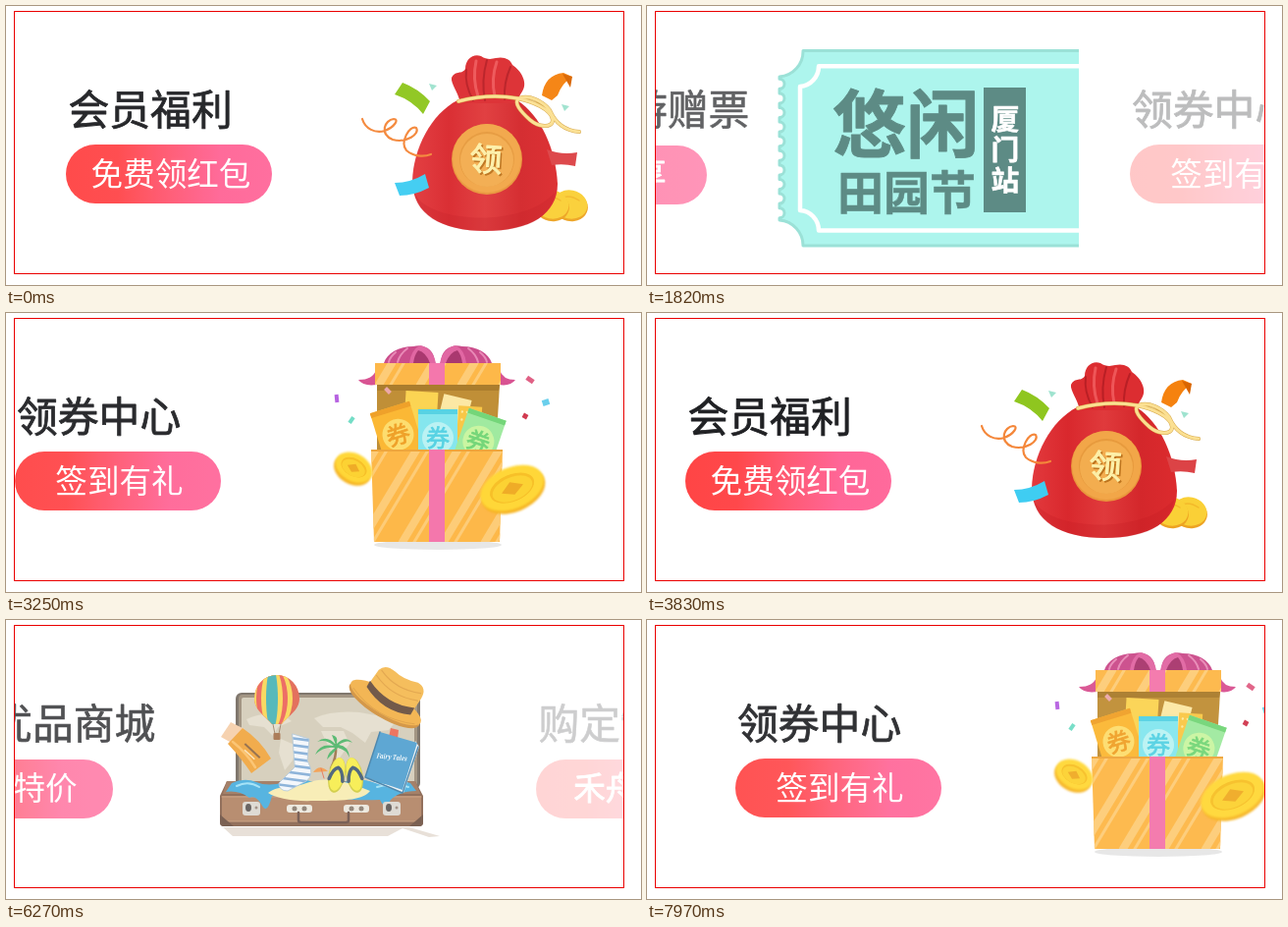
These frames come from a looping animation (647x284 px, 8 s). An HTML page with a canvas:

```html
<!DOCTYPE html>
<html lang="zh">
<head>
<meta charset="utf-8">
<title>Banner carousel</title>
<style>
html, body { margin: 0; width: 100%; height: 100%; overflow: hidden; background: #fff; }
canvas { display: block; }
</style>
</head>
<body>
<canvas id="stage" width="647" height="284"></canvas>
<script>
const W = 647, H = 284, LOOP = 8000, PITCH = 641;
const LEFT = 9, TOP = 6, VIEW_W = 620, VIEW_H = 266;
const SANS = '"Noto Sans CJK SC", "Noto Sans CJK", sans-serif';
const view = document.getElementById('stage').getContext('2d');
let g;

// ---- drawing helpers ----
function fill(d, color) {
  g.fillStyle = color;
  g.fill(new Path2D(d));
}
function line(d, color, width) {
  g.strokeStyle = color;
  g.lineWidth = width;
  g.lineCap = g.lineJoin = 'round';
  g.stroke(new Path2D(d));
}
function oval(x, y, rx, ry, color, turn = 0) {
  g.fillStyle = color;
  g.beginPath();
  g.ellipse(x, y, rx, ry, turn, 0, 7);
  g.fill();
}
function box(x, y, w, h, color, r = 0) {
  g.fillStyle = color;
  g.beginPath();
  g.roundRect(x, y, w, h, r);
  g.fill();
}
function text(s, x, y, size, color, weight = 400, bold = 0, align = 'left') {
  g.font = `${weight} ${size}px ${SANS}`;
  g.textAlign = align;
  g.fillStyle = color;
  g.fillText(s, x, y);
  if (bold) {
    g.strokeStyle = color;
    g.lineWidth = bold;
    g.lineJoin = 'round';
    g.strokeText(s, x, y);
  }
}
function blend(x0, y0, x1, y1, ...colors) {
  const grad = g.createLinearGradient(x0, y0, x1, y1);
  colors.forEach((c, i) => grad.addColorStop(i / (colors.length - 1), c));
  return grad;
}
function turned(x, y, angle, draw) {
  g.save();
  g.translate(x, y);
  g.rotate(angle);
  draw();
  g.restore();
}
function within(d, draw) {
  g.save();
  g.clip(new Path2D(d));
  draw();
  g.restore();
}
function heading(title, x, bold, label, labelX, pillX, pillY, labelBold = 0) {
  text(title, x, 120.5, 41.8, '#202124', 400, bold);
  box(pillX, pillY, 210, 60, blend(pillX, 0, pillX + 210, 0, '#ff4545', '#ff484b', '#ff5a74', '#ff6697', '#ff6a9c'), 30);
  text(label, labelX, 183.3, 32.6, '#fff', 400, labelBold, 'center');
}

// ---- slides ----
function bagSlide() {
  heading('会员福利', 41.5, 0.8, '免费领红包', 146, 39, 141);

  for (const x of [553, 534]) {
    oval(x, 204, 18, 15, '#eda322', 0.2);
    oval(x, 202, 17.5, 14.5, '#fad036', 0.2);
    line(`M${x - 10} 196Q${x - 1} 191 ${x + 9} 198`, '#f3b92a', 1.5);
  }
  fill('M374 90L382 78Q398 84 410 97L403 110Q392 96 374 90Z', '#8fc61f');
  fill('M524 91Q527 70 546 68L555 72Q544 79 540 91L534 96Z', '#f5820f');
  fill('M545 69L555 72L553 83Q549 76 545 69Z', '#d96500');
  fill('M409 79L417 81L412 86Z M544 100L552 102L547 107Z', '#9fe3cf');

  const red = blend(392, 0, 540, 0, '#e2393d', '#d9282d', '#e03a3c', '#d4272b', '#dc2b2e');
  fill('M438 96C411 110 393 145 392 178C392 212 422 229 466 229C512 229 540 212 540 181C538 145 523 112 499 96Z', red);
  fill('M441 99C439 88 431 79 432 73C436 65 443 70 446 64C446 54 454 48 462 51C468 55 473 54 477 53C485 51 492 54 494 60C503 66 510 78 504 87C501 91 500 95 499 99Z', '#dc2d31');
  line('M447 65Q445 80 454 96 M468 55Q462 76 466 96 M492 62Q485 78 486 95', '#b91f25', 2);
  line('M457 56Q453 74 459 92 M478 57Q472 74 476 92', '#ee5658', 3);
  fill('M394 190C408 222 506 226 537 190C532 219 505 229 466 229C428 229 398 216 394 190Z', 'rgba(190,24,32,.25)');

  fill('M374 180Q390 180 405 171L409 185Q394 193 379 193Z', '#3fcdf2');
  fill('M529 146Q544 152 560 149L558 163Q546 160 534 162Z', '#dc4346');
  line('M341 115C344 125 354 130 364 127C374 123 379 115 373 115C364 116 358 130 372 136C386 140 400 130 396 124C389 121 379 139 386 147C393 153 403 154 411 151', '#f4873a', 2.2);

  const rope = 'M439 97Q470 89 499 94C514 97 534 105 535 116C535 125 520 123 512 116C503 108 494 98 501 94C511 90 525 97 532 106C538 120 549 127 562 128';
  line(rope, '#d6a84c', 4);
  line(rope, '#fbe092', 3);

  oval(468, 156, 36, 36, '#e9963c');
  oval(468, 155, 35, 35, '#f2a648');
  oval(468, 156, 28, 28, '#e79a3d');
  oval(468, 157, 27, 27, '#f3ad4f');
  turned(467, 156, 0.06, () => {
    text('领', 1.5, 13.5, 33, '#bd741e', 400, 1.2, 'center');
    text('领', 0, 12, 33, '#fdf0a9', 400, 1.2, 'center');
  });
}

function balloon() {
  const shell = 'M394 80A23 24 0 0 1 440 80C440 92 428 98 422 106H412C406 98 394 92 394 80Z';
  within(shell, () => {
    box(394, 56, 46, 52, '#dc4a32');
    [['#f8cf38', 21], ['#e8463c', 16], ['#f8cf38', 11], ['#28a6a8', 6]].forEach(([c, r]) => oval(412, 80, r, 32, c));
  });
  line('M413 106L415 116M421 106L419 116', '#7c5637', 0.8);
  box(413.5, 115, 7, 7, '#96592d', 1);
}
function flipflop(x, angle) {
  turned(x, 158, angle, () => {
    oval(0, 0, 8.5, 18, '#c7c21d');
    oval(0, -1, 7.5, 17, '#f6ea2d');
    line('M-7 5Q-5 -6 0 -8Q5 -6 7 5', '#24405c', 3.5);
  });
}
function hat() {
  turned(528, 84, 0.53, () => {
    oval(0, 3, 41, 13, '#c97c18');
    oval(0, 0, 41, 12.5, '#f0a226');
    line('M-36 4Q0 20 36 4', '#d98d1d', 1);
    fill('M-25 -4L-23 -25Q-20 -34 -8 -32Q4 -29 18 -34Q29 -34 29 -22L28 -2Q2 10 -25 -4Z', '#f3ac30');
    fill('M-25 -11Q2 2 28 -10V-2Q2 10 -25 -4Z', '#4b2c18');
    line('M-22 -19Q2 -8 27 -18M-20 -26Q2 -16 26 -26', '#dc9121', 1.2);
  });
}
function suitcaseSlide() {
  heading('禾舟优品商城', 42.5, 0.65, '限时特价', 148.5, 40, 142);

  fill('M362 211H552L583 220L572 221L545 212L530 220H372Z', '#e2d8ce');
  box(375, 74, 188, 98, '#5d5145', 6);
  box(378, 76, 182, 96, '#8a7962', 4);
  box(381, 79, 176, 93, '#cdc4ac', 2);
  fill('M386 101Q402 93 424 97L432 103L418 109L413 118L404 109L389 107Z M421 121L437 128L433 143L425 153L419 135Z M455 100Q473 92 501 94L540 101L531 112L513 114L507 125L494 115L482 109L464 109Z M462 113L485 113L491 126L479 143L470 130Z M521 132L540 129L546 143L528 148Z', '#dfd8c5');

  fill('M366 164H558L566 179V206Q566 210 562 210H363Q359 210 359 206V179Z', '#74482f');
  fill('M361 179H564V205H361Z', '#a56f4a');
  line('M361 180H564M362 205H563', '#bd8a64', 1);
  fill('M366 164H558L563 177H362Z', '#8c5e40');
  fill('M371 166Q384 160 396 165T425 165T455 165T485 165T515 165Q536 160 553 166L559 174C546 174 538 178 533 183Q527 194 522 183C497 184 484 182 452 182L412 179Q407 199 402 189Q396 178 389 181Q378 173 365 175Z', '#29a0d8');
  fill('M408 176C420 167 432 172 447 166C469 158 490 165 512 174C505 183 489 184 455 184C432 185 416 181 408 176Z', '#f7e9a4');
  line('M376 169Q388 163 399 170M519 170Q536 165 551 170', '#8edcf5', 2);
  for (const x of [382, 525]) {
    box(x, 185, 18, 14, '#d5d2c9', 3);
    oval(x + 6, 191, 3, 4, '#403b38');
    oval(x + 14, 191, 1.5, 1.5, '#8a7667');
  }
  for (const x of [427, 485]) {
    box(x, 188, 26, 8, '#e8e3d7', 3);
    oval(x + 8, 192, 2.5, 2.5, '#776758');
    oval(x + 18, 192, 2.5, 2.5, '#776758');
  }
  line('M439 196V204Q439 206 442 206H487Q490 206 490 204V196', '#55362a', 2.5);
  fill('M359 198L373 210H363Q359 210 359 206Z M566 198L552 210H562Q566 210 566 206Z', '#573523');

  balloon();
  fill('M360 119L370 104L384 111L376 128Z', '#f4c69b');
  fill('M367 126L382 110Q400 122 411 141L391 156Q381 141 367 126Z', '#ee951c');
  line('M372 124Q386 135 395 150', '#fbb64f', 2.5);
  turned(391, 135, 0.75, () => {
    box(-11, -3, 21, 2, '#7b4e22');
    box(-7, 2, 14, 1.5, '#fbe0ad');
  });

  const sock = 'M433 116L450 121L448 143Q456 157 447 164L428 174Q419 174 419 166L435 150Z';
  fill(sock, '#f2f6fa');
  within(sock, () => {
    for (let y = 121; y < 176; y += 7) line(`M415 ${y - 3}L460 ${y + 3}`, '#6f9fd0', 2.6);
  });
  line(sock, '#9bb9d0', 0.8);

  line('M472 151Q478 140 477 127', '#8b5a2b', 2.5);
  fill('M477 127Q468 116 458 124Q467 121 475 128Q461 125 456 137Q465 128 477 130Q469 134 468 142Q476 134 479 130Q488 132 491 140Q490 128 480 127Q489 121 494 125Q487 117 478 126Q480 118 473 117Z', '#2fa84f');
  fill('M454 155Q460 146 469 154Z', '#f18b2c');
  line('M462 151L465 161', '#e35c35', 1);
  flipflop(478, 0.2);
  flipflop(496, -0.2);

  fill('M533 110L541 112L540 121L531 119Z', '#e84f35');
  fill('M509 163L546 176L562 129L558 123L545 171Z', '#e8eef0');
  fill('M522 114L560 125L545 173L507 160Z', '#318fc7');
  line('M522 114L507 160L545 176L561 129', '#1d6798', 1.4);
  turned(534, 142, 0.1, () => {
    g.font = 'italic 700 7px "Noto Serif", serif';
    g.textAlign = 'center';
    g.fillStyle = '#fff';
    g.fillText('Fairy Tales', 0, 0, 31);
  });
  hat();
}

function ticketSlide() {
  heading('购定制游赠票', 42.5, 0.6, '禾舟专享', 143.3, 40, 142, 0.9);
  const notches = 'v2.3a5 5 0 0 1 0 10v2.3'.repeat(10);
  const edge = `M645 45.5H348A26 26 0 0 1 324 72${notches}A26 26 0 0 1 348 244H645`;
  fill(edge + 'Z', '#8cf2e6');
  line(edge, '#72d5c7', 3);
  line('M645 61.3H364A20 21 0 0 1 345 82V208A20 21 0 0 1 364 228.5H645', '#fff', 4.5);
  const ink = '#1b5b53';
  text('悠闲', 378, 148, 75, ink, 700, 0.8);
  text('田园节', 383, 207, 47, ink, 700, 0.5);
  box(532, 83, 43, 127, ink);
  [...'厦门站'].forEach((c, i) => text(c, 554, 125.7 + 31 * i, 28.8, '#fff', 700, 0.6, 'center'));
}

function coupon(x, y, w, h, angle, color, seal, ink) {
  turned(x, y, angle, () => {
    box(-w / 2, -24, w, h, color);
    box(-w / 2, -24, w, 5, ink);
    oval(0, 5, 16, 16, seal);
    text('券', 0, 14, 24, ink, 400, 0.8, 'center');
  });
}
function goldCoin(x, y, rx, ry, angle) {
  turned(x, y, angle, () => {
    g.filter = 'blur(1.2px)';
    oval(0, 2.5, rx, ry, '#f6b21b');
    oval(0, -1, rx, ry, '#ffd62f');
    g.filter = 'none';
    oval(0, -1, rx * 0.7, ry * 0.65, '#f7bd1e');
    oval(0, 0, rx * 0.63, ry * 0.56, '#fcd02a');
    fill(`M${-rx * 0.35} 0L0 ${-ry * 0.35}L${rx * 0.35} 0L0 ${ry * 0.3}Z`, '#efa81d');
  });
}
function stripes(d, x0, x1, y0, y1) {
  within(d, () => {
    for (let x = x0; x < x1; x += 42) {
      line(`M${x} ${y1}L${x + (y1 - y0) * 0.6} ${y0}`, '#fdca72', 8);
      line(`M${x + 12} ${y1}L${x + 12 + (y1 - y0) * 0.6} ${y0}`, '#fdca72', 3);
    }
  });
}
function giftSlide() {
  heading('领券中心', 42, 0.8, '签到有礼', 146.5, 40, 141);
  g.translate(31, 0);
  oval(440, 236, 65, 5, '#e6e6e6');

  fill('M377 58Q374 68 359 68Q364 75 378 73Z M503 58Q506 68 519 68Q514 75 502 73Z', '#d74b8d');
  for (const side of [-1, 1]) {
    g.save();
    g.translate(440, 0);
    g.scale(side, 1);
    fill('M3 51C3 37 14 31 25 34C40 34 52 41 55 51Z', '#c94586');
    fill('M2 51Q5 36 18 33Q27 37 29 51Z', '#e0609f');
    fill('M8 51Q12 40 20 38Q24 43 25 51Z', '#a52f68');
    line('M31 36Q39 42 41 50M43 40Q49 45 50 50', '#e885b4', 2);
    g.restore();
  }
  fill('M378 73H503L499 140H378Z', '#bd8a2e');
  fill('M378 73H503L502 79H378Z', '#a77723');
  const lid = 'M376 51H504V73H376Z';
  fill(lid, '#fdb541');
  stripes(lid, 380, 510, 51, 73);
  box(431, 51, 16, 22, '#f471a8');

  turned(422, 105, 0.06, () => box(-16, -25, 33, 55, '#fbd24b'));
  turned(455, 110, 0.24, () => box(-15, -25, 29, 55, '#fce7a0'));
  turned(472, 115, 0.06, () => {
    box(-12, -20, 24, 40, '#f9c53e');
    for (let i = 0; i < 8; i++) oval(-8 + (i % 4) * 5, -14 + (i >> 2) * 8, 1.2, 1.2, '#fdea9c');
  });
  coupon(398, 119, 42, 65, -0.3, '#fbb52c', '#fddc68', '#ef9d20');
  coupon(440, 122, 40, 62, 0, '#80e5ee', '#b8f2f3', '#4fd0e2');
  coupon(483, 126, 40, 60, 0.33, '#9ce99c', '#c8f59e', '#6ed473');

  const front = 'M372 139H506L503 233H375Z';
  fill(front, '#fdb541');
  stripes(front, 320, 510, 139, 233);
  box(372, 139, 134, 2, '#eea234');
  box(431, 139, 16, 94, '#f471a8');
  goldCoin(354, 158, 20, 14, 0.5);
  goldCoin(516, 179, 34, 21, -0.4);

  [[337, 87, 4, 8, -0.1, '#b45ce0'], [352, 109, 4, 7, 0.6, '#6edcc4'], [534, 68, 8, 5, 0.6, '#df5a80'],
   [550, 91, 7, 6, -0.3, '#63cdec'], [529, 105, 5, 5, 0.5, '#cf3148'], [389, 79, 7, 4, 0.8, '#eca4a5']]
    .forEach(([x, y, w, h, a, c]) => turned(x, y, a, () => box(-w / 2, -h / 2, w, h, c)));
}

// ---- carousel ----
function render(draw) {
  const sheet = document.createElement('canvas');
  sheet.width = W;
  sheet.height = H;
  g = sheet.getContext('2d');
  g.beginPath();
  g.rect(LEFT, TOP, VIEW_W, VIEW_H);
  g.clip();
  draw();
  return sheet;
}
const slides = [bagSlide, suitcaseSlide, ticketSlide, giftSlide].map(render);

// [ms, carousel position in slides], held until the next step
const steps = [
  [0, 3.966], [150, 4], [300, 2],
  [1820, 2.295], [1950, 2.757], [2100, 2.963], [2250, 3],
  [3250, 3.048], [3400, 3.63], [3520, 3.885], [3670, 3.993], [3830, 4],
  [4700, 4.02], [4850, 4.575], [5000, 4.9], [5150, 5],
  [6270, 5.22], [6420, 5.755], [6570, 5.965], [6690, 6],
  [7680, 6.085], [7830, 6.665], [7970, 6.922]
];

function paint(ms) {
  const pos = steps.findLast(s => s[0] <= ms)[1];
  const first = Math.floor(pos);
  view.globalAlpha = 1;
  view.fillStyle = '#fff';
  view.fillRect(0, 0, W, H);
  view.save();
  view.beginPath();
  view.rect(LEFT, TOP, VIEW_W, VIEW_H);
  view.clip();
  for (const n of [first, first + 1]) {
    const alpha = 1 - Math.abs(n - pos);
    if (alpha < 0.1) continue; // too faint to show
    view.globalAlpha = alpha;
    view.drawImage(slides[n % 4], Math.round((n - pos) * PITCH), 0);
  }
  view.restore();
  view.strokeStyle = '#ea0000';
  view.lineWidth = 1;
  view.strokeRect(8.5, 5.5, 621, 267);
}

const start = performance.now();
function tick() {
  paint((performance.now() - start) % LOOP);
  requestAnimationFrame(tick);
}
tick();
</script>
</body>
</html>
```
